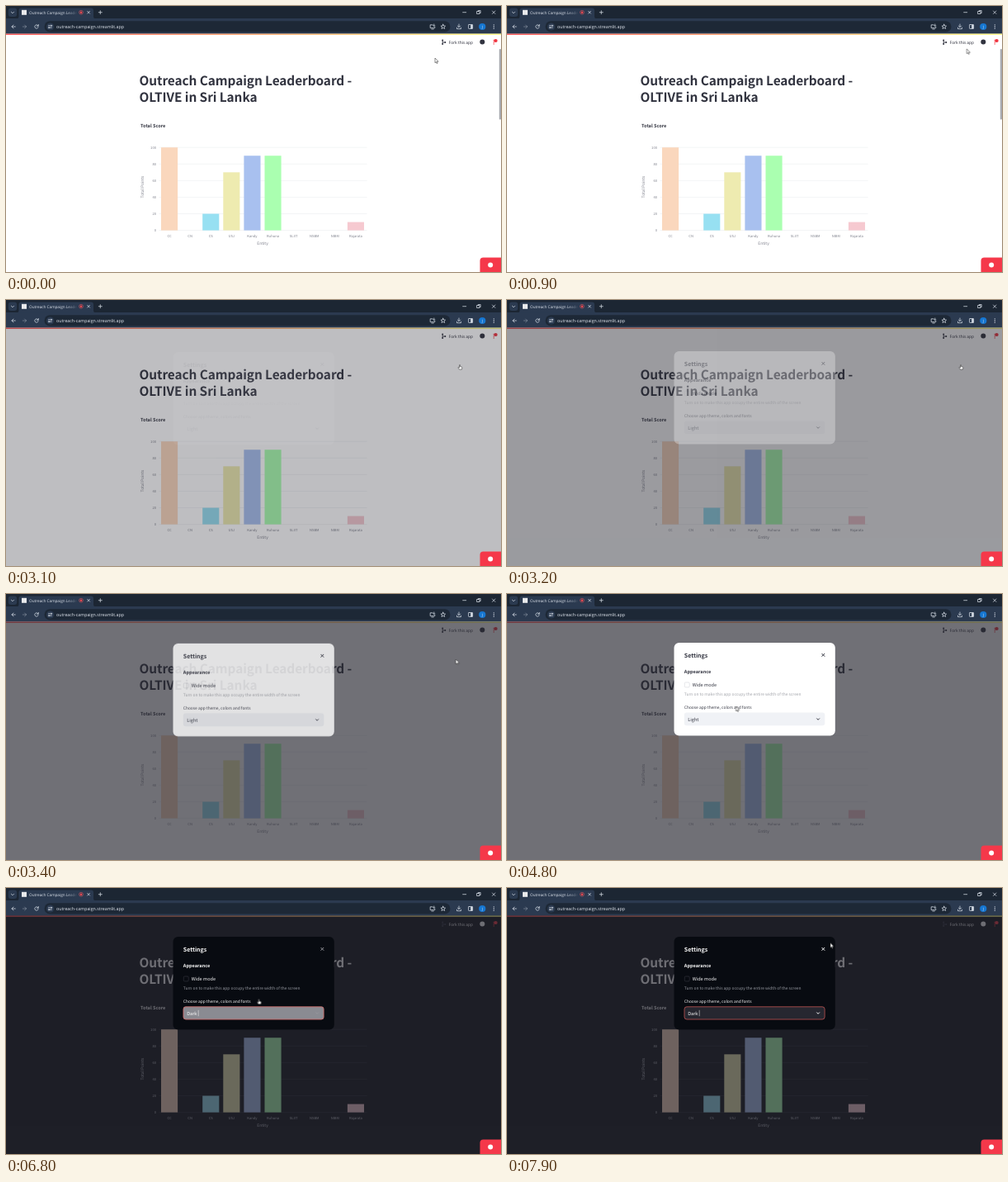
These frames come from a looping animation (600 by 322 pixels, 8000 ms). An HTML page:

```html
<!DOCTYPE html>
<html lang="en">
<head>
<meta charset="utf-8">
<title>Leaderboard settings</title>
<style>
html, body { margin: 0; width: 100%; height: 100%; overflow: hidden; background: #fff; }
svg { display: block; width: 100vw; height: 100vh; animation: theme 8s step-end infinite; }
text { font: 5.6px "Noto Sans CJK JP", "Noto Sans CJK SC", "Noto Sans CJK", "Open Sans", sans-serif; text-rendering: geometricPrecision; fill: var(--text); }
.ui text { font-family: "Open Sans", "Noto Sans", sans-serif; fill: #e3e8f0; }
text.h1 { font-size: 15.4px; font-weight: 700; letter-spacing: -.005em; }
text.h2 { font-size: 7px; font-weight: 700; }
text.b { font-weight: 700; }
text.s { font-size: 4.9px; }
text.muted { fill: var(--muted); }
text.red { fill: #ff2b2b; font-weight: 700; }
.axis text { font-size: 4.15px; fill: var(--axis); }
.axis text.s { font-size: 4.9px; }
.line { fill: none; stroke: #d5dbe5; stroke-width: .75; stroke-linecap: round; stroke-linejoin: round; }

/* Page and dialog colours flip together when the theme changes */
@keyframes theme {
  0% { --bg: #fff; --text: #31333f; --muted: #a2a4aa; --axis: #80838e; --grid: #e6e8ed; --box: #d4d6db; --dialog: #fff; }
  83.75%, 100% { --bg: #0e1117; --text: #fafafa; --muted: #989ba3; --axis: #c4c7ce; --grid: #30333d; --box: #363842; --dialog: #080b11; }
}

.shade { animation: shade 8s linear infinite; }
@keyframes shade { 0%, 36.5% { opacity: 0 } 41.5%, 100% { opacity: 1 } }
.dialog { animation: dialog 8s linear infinite; }
@keyframes dialog {
  0%, 38.5% { opacity: 0; transform: translateY(4.3px) }
  43.5%, 100% { opacity: 1; transform: none }
}
.menu { animation: menu 8s linear infinite; }
@keyframes menu { 0%, 20% { opacity: 0 } 22%, 35.5% { opacity: 1 } 36.5%, 100% { opacity: 0 } }
.scroll { animation: scroll 8s step-end infinite; }
@keyframes scroll { 0% { opacity: 1 } 21%, 100% { opacity: 0 } }

.list { animation: list 8s linear infinite; }
@keyframes list { 0%, 67.5% { opacity: 0 } 69%, 83.7% { opacity: 1 } 83.75%, 100% { opacity: 0 } }
.focus { animation: focus 8s step-end infinite; }
@keyframes focus { 0% { opacity: 0 } 67.5%, 100% { opacity: 1 } }
.light { animation: light 8s step-end infinite; }
@keyframes light { 0% { opacity: 1 } 83.75%, 100% { opacity: 0 } }
.dark { animation: dark 8s step-end infinite; }
@keyframes dark { 0% { opacity: 0 } 83.75%, 100% { opacity: 1 } }
.field { animation: field 8s linear infinite; }
@keyframes field { 0%, 83.75% { fill: #f0f2f6 } 86.25%, 100% { fill: #262730 } }
.close { animation: close 8s linear infinite; }
@keyframes close { 0%, 83.75% { stroke: #31333f } 86.25%, 100% { stroke: #fafafa } }

.pointer { animation: move 8s ease-in-out infinite; }
@keyframes move {
  0%, 4% { transform: translate(520px, 63px) }
  18%, 27% { transform: translate(590px, 42px) }
  34%, 41% { transform: translate(550px, 78px) }
  57%, 61% { transform: translate(277.5px, 136px) }
  66%, 75% { transform: translate(300px, 148px) }
  80%, 87.5% { transform: translate(306.5px, 134.5px) }
  97%, 100% { transform: translate(392px, 66.5px) }
}
.pointer path { fill: #fff; stroke: #222; stroke-width: .5; stroke-linejoin: round; }
.arrow { animation: arrow 8s step-end infinite; }
@keyframes arrow { 0% { opacity: 1 } 17% { opacity: 0 } 42% { opacity: 1 } 65% { opacity: 0 } 89%, 100% { opacity: 1 } }
.hand { animation: hand 8s step-end infinite; }
@keyframes hand { 0% { opacity: 0 } 17% { opacity: 1 } 42% { opacity: 0 } 65% { opacity: 1 } 68% { opacity: 0 } 76% { opacity: 1 } 89%, 100% { opacity: 0 } }
</style>
</head>
<body>
<svg viewBox="0 0 600 322" preserveAspectRatio="none">
  <defs>
    <linearGradient id="rainbow"><stop stop-color="#ff4b4b"/><stop offset="1" stop-color="#fffd80"/></linearGradient>
    <linearGradient id="fade"><stop offset=".78" stop-color="#2b3a50" stop-opacity="0"/><stop offset="1" stop-color="#2b3a50"/></linearGradient>
    <clipPath id="tabClip"><rect x="27" y="0" width="59" height="15"/></clipPath>
    <filter id="shadow" x="-20%" y="-20%" width="140%" height="140%"><feDropShadow dx="0" dy="1.5" stdDeviation="2" flood-opacity=".28"/></filter>
  </defs>

  <!-- Page -->
  <rect y="33" width="600" height="289" fill="var(--bg)"/>
  <rect y="33.4" width="600" height="1.5" fill="url(#rainbow)"/>
  <g fill="none" stroke="#31333f" stroke-width=".8">
    <path d="M529.2 42v4M529.2 44h3.2"/>
    <g fill="#31333f" stroke="none"><circle cx="529.2" cy="41.4" r="1"/><circle cx="529.2" cy="46" r="1"/><circle cx="532.3" cy="44" r="1"/></g>
  </g>
  <text class="s" x="536.5" y="45.5">Fork this app</text>
  <circle cx="577.3" cy="43.6" r="3" fill="var(--text)"/>
  <rect class="menu" x="586" y="38" width="12" height="11.5" rx="2" fill="#e3e4e9"/>
  <g fill="#f0333f">
    <circle cx="593.6" cy="42" r="2.1"/>
    <circle cx="591.3" cy="41.5" r=".7"/><circle cx="591.3" cy="43.7" r=".7"/><circle cx="591.3" cy="45.9" r=".7"/>
  </g>
  <rect class="scroll" x="597.8" y="52" width="2.2" height="85.5" rx="1" fill="#a9abb1"/>
  <text class="h1" x="161.5" y="95.6">Outreach Campaign Leaderboard -</text>
  <text class="h1" x="161.5" y="116.2">OLTIVE in Sri Lanka</text>
  <text class="b" x="163" y="146.6">Total Score</text>
  <g class="axis" id="chart">
    <text class="s" x="311" y="289.2" text-anchor="middle">Entity</text>
    <text class="s" transform="translate(167 219) rotate(-90)" text-anchor="middle">Total Points</text>
  </g>

  <!-- Main menu -->
  <g class="menu">
    <rect x="526" y="53" width="72" height="98.5" rx="3" fill="#fff" filter="url(#shadow)"/>
    <path d="M526 86.5h72M526 119.5h72" stroke="#dfe0e4" stroke-width=".5"/>
    <text x="535.3" y="65">Rerun</text><text class="muted" x="555.8" y="64.6" style="font-size:4px">R</text>
    <text x="535.3" y="78.2">Settings</text>
    <text x="535.3" y="97.8">Print</text>
    <text class="red" x="535.3" y="111">Stop recording</text><text class="red" x="579.5" y="110.7" style="font-size:4.3px">ESC</text>
    <text x="535.3" y="130.7">Fork this app</text>
    <text x="535.3" y="143.9">About</text>
  </g>

  <!-- Settings dialog -->
  <rect class="shade" y="33.4" width="600" height="289" fill="#262730" fill-opacity=".66"/>
  <g class="dialog">
    <rect x="202.5" y="59" width="195.3" height="112.5" rx="6" fill="var(--dialog)"/>
    <text class="h2" x="214.8" y="76.7">Settings</text>
    <path class="close" d="M381.5 72l3.7 3.7m0-3.7l-3.7 3.7" stroke-width="1"/>
    <text class="b" x="214.8" y="96">Appearance</text>
    <rect x="215.3" y="107" width="5.9" height="5.9" rx="1.2" fill="none" stroke="var(--box)" stroke-width=".6"/>
    <text x="224.7" y="111.8">Wide mode</text>
    <text class="s muted" x="214.8" y="123">Turn on to make this app occupy the entire width of the screen</text>
    <text class="s" x="214.8" y="139.4">Choose app theme, colors and fonts</text>
    <rect class="field" x="214.8" y="143.6" width="170.5" height="15.6" rx="3"/>
    <g class="focus">
      <rect x="215" y="143.8" width="170.1" height="15.2" rx="3" fill="none" stroke="#f0605c" stroke-width=".6"/>
      <path d="M233.2 147.8v7.4" stroke="var(--text)" stroke-width=".5"/>
    </g>
    <text class="light" x="219.2" y="153.5">Light</text>
    <text class="dark" x="219.2" y="153.5">Dark</text>
    <path class="close" d="M375.3 150.5l1.8 1.8 1.8-1.8" fill="none" stroke-width="1"/>
    <g class="list">
      <rect x="214.8" y="96.2" width="170.6" height="47" rx="2" fill="#fff" filter="url(#shadow)"/>
      <rect x="214.8" y="112.2" width="170.6" height="15.6" fill="#f0f2f6"/>
      <text x="221" y="106.4">Use system setting</text>
      <text x="221" y="122">Light</text>
      <text x="221" y="137.6">Dark</text>
    </g>
  </g>

  <!-- Hosting badge -->
  <path d="M574.5 322v-13.5q0-4 4-4H600V322z" fill="#f5384a"/>
  <circle cx="587.2" cy="313.4" r="3" fill="#fff"/>

  <!-- Browser -->
  <g class="ui">
    <rect width="600" height="15.5" fill="#1c2633"/>
    <rect y="15" width="600" height="18.4" fill="#2b3a50"/>
    <rect x="2.8" y="2.6" width="10.4" height="10.4" rx="3" fill="#2b3a50"/>
    <path class="line" d="M6.4 7.2l1.6 1.6 1.6-1.6"/>
    <path d="M12.5 15.5q3 0 3-3V5.5q0-3 3-3H103q3 0 3 3v7q0 3 3 3z" fill="#2b3a50"/>
    <rect x="19" y="4.8" width="6" height="6" fill="#e9eaec"/>
    <text x="28" y="9.6" clip-path="url(#tabClip)" style="font-size:4.7px">Outreach Campaign Leaderboard</text>
    <rect x="27" y="3" width="59.5" height="11" fill="url(#fade)"/>
    <circle cx="91" cy="7.7" r="2.4" fill="none" stroke="#e0555c" stroke-width=".6"/><circle cx="91" cy="7.7" r="1.3" fill="#f0474f"/>
    <path class="line" d="M98.7 6.3l2.8 2.8m0-2.8l-2.8 2.8M112.3 7.7h4M114.3 5.7v4M553.7 7.7h4M571 6.5h3v3h-3zM572.2 6.5v-1h3v3h-1M589.5 6l3.4 3.4m0-3.4L589.5 9.4"/>
    <path class="line" d="M11.3 25H7m2-2l-2 2 2 2"/>
    <path class="line" d="M20.3 25h4.3m-2-2l2 2-2 2" opacity=".45"/>
    <path class="line" d="M39 24a2.2 2.2 0 1 0 .1 1.8M39.3 22.4V24.2h-1.8"/>
    <rect x="46.5" y="18.3" width="492" height="13.2" rx="6.6" fill="#1d2836"/>
    <circle cx="53.6" cy="25" r="4.6" fill="#2b3a50"/>
    <path class="line" d="M51.5 23.8h2m1.8 2.4h-2"/>
    <circle class="line" cx="54.9" cy="23.8" r=".7"/><circle class="line" cx="52" cy="26.2" r=".7"/>
    <text x="61" y="26.9" style="font-size:5.3px">outreach-campaign.streamlit.app</text>
    <path class="line" d="M517 22.8h-2.8v3.8h5.6v-1.4M515.8 28h2.5M518.8 22v2.4m-1-.9l1 1 1-1"/>
    <path class="line" d="M529.8 22.2l.8 1.8 2 .2-1.5 1.3.5 2-1.8-1.1-1.8 1.1.5-2-1.5-1.3 2-.2z"/>
    <path class="line" d="M549 22v3.6m-1.6-1.5l1.6 1.6 1.6-1.6M546.5 26.2v1.5h5v-1.5"/>
    <rect class="line" x="560.6" y="22.5" width="5" height="5" rx=".6"/><rect x="563.2" y="22.5" width="2.4" height="5" fill="#d5dbe5"/>
    <circle cx="577.3" cy="25" r="4.1" fill="#1677d2"/><text x="577.3" y="26.7" text-anchor="middle" style="font-size:4.6px">J</text>
    <g fill="#d5dbe5"><circle cx="591.3" cy="22.8" r=".65"/><circle cx="591.3" cy="25" r=".65"/><circle cx="591.3" cy="27.2" r=".65"/></g>
  </g>

  <g class="pointer">
    <path class="arrow" d="M0 0v5.8l1.3-1.2.9 2 .9-.4-.9-1.9h1.9z"/>
    <path class="hand" d="M-.5.6q.5-.9 1 0v2l1.7.4q.8.2.7 1L2.5 6H-.6L-2 4q-.2-.8.6-.6l.9.6z"/>
  </g>
</svg>
<script>
const chart = document.getElementById("chart");
const names = ["CC", "CN", "CS", "USJ", "Kandy", "Ruhuna", "SLIIT", "NSBM", "NIBM", "Rajarata"];
const scores = [100, 0, 20, 70, 90, 90, 0, 0, 0, 10];
const colors = { CC: "#fad7bd", CS: "#97e0f2", USJ: "#eeebb0", Kandy: "#a8c0ef", Ruhuna: "#aaffb0", Rajarata: "#f6c9d0" };
const base = 271.6, unit = 1.004, step = 25.1;

function add(tag, attrs, label = "") {
  const el = document.createElementNS("http://www.w3.org/2000/svg", tag);
  for (const key in attrs) el.setAttribute(key, attrs[key]);
  el.textContent = label;
  chart.append(el);
}

for (let v = 0; v <= 100; v += 20) {
  const y = base - v * unit;
  add("path", { d: `M185.5 ${y}h252`, stroke: "var(--grid)", "stroke-width": .5 });
  add("text", { x: 182, y: y + 1.5, "text-anchor": "end" }, v);
}
names.forEach((name, i) => {
  const x = 198 + i * step, h = scores[i] * unit;
  if (h) add("rect", { x: x - 10, y: base - h, width: 20.1, height: h, fill: colors[name] });
  add("text", { x, y: 279.8, "text-anchor": "middle" }, name);
});
</script>
</body>
</html>
```
